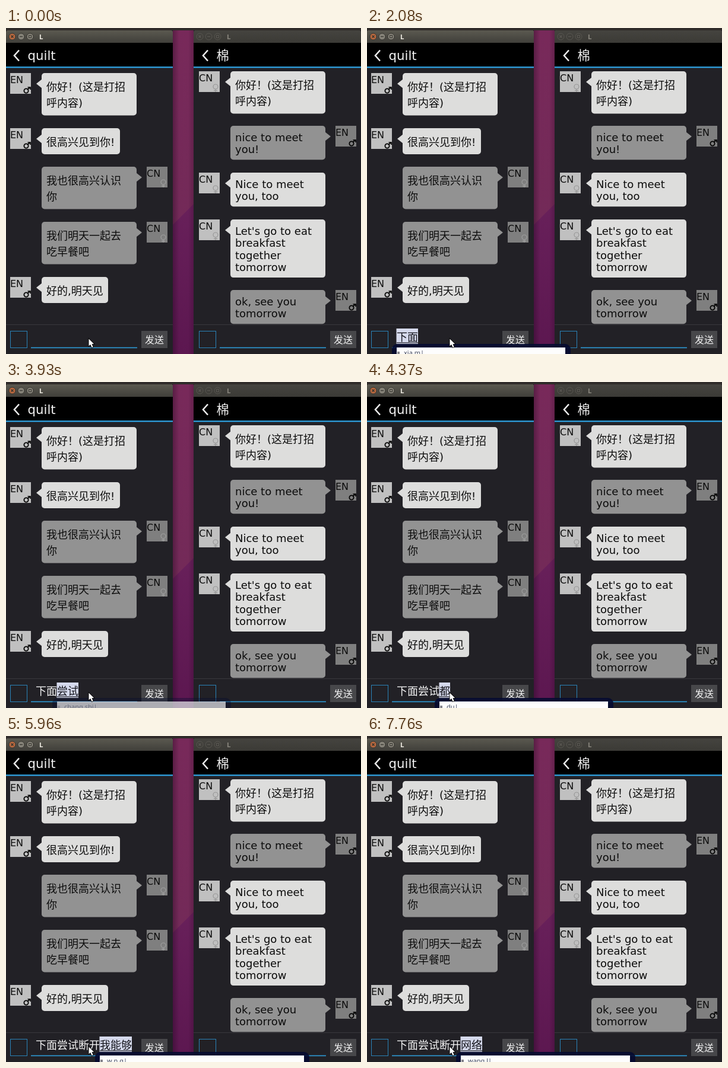
Recreate the animation shown at these times as an HTML page with a canvas. Size 598x550 px, loop 8 s.

```html
<!DOCTYPE html>
<html lang="zh-CN">
<head>
<meta charset="utf-8">
<title>Chat</title>
<style>
html, body { margin: 0; width: 100%; height: 100%; overflow: hidden; background: #222126; }
canvas { display: block; }
</style>
</head>
<body>
<canvas id="stage" width="598" height="550"></canvas>
<script>
const W = 598, H = 550, LOOP = 8000;
const FONT = '"DejaVu Sans", "Noto Sans CJK SC", "Noto Sans CJK", sans-serif';
const BLUE = '#2d9bd8';
const PALE = '#dddddc', GREY = '#929292';
const g = document.getElementById('stage').getContext('2d');

function rect(x, y, w, h, fill) {
  g.fillStyle = fill;
  g.fillRect(x, y, w, h);
}

function rounded(x, y, w, h, r, fill) {
  g.fillStyle = fill;
  g.beginPath();
  g.roundRect(x, y, w, h, r);
  g.fill();
}

function text(s, x, y, size, fill, font = FONT, weight = '') {
  g.font = `${weight} ${size}px ${font}`;
  g.fillStyle = fill;
  g.fillText(s, x, y);
}

function path(points, width, stroke) {
  g.beginPath();
  points.forEach(([x, y], i) => i ? g.lineTo(x, y) : g.moveTo(x, y));
  g.lineWidth = width;
  g.strokeStyle = stroke;
  g.stroke();
}

function ring(x, y, r, width, stroke) {
  g.beginPath();
  g.arc(x, y, r, 0, Math.PI * 2);
  g.lineWidth = width;
  g.strokeStyle = stroke;
  g.stroke();
}

function vertical(y0, y1, from, to) {
  const fill = g.createLinearGradient(0, y0, 0, y1);
  fill.addColorStop(0, from);
  fill.addColorStop(1, to);
  return fill;
}

function desktop() {
  rect(281, 0, 35, H, vertical(0, 330, '#78295a', '#732a58'));
  g.fillStyle = vertical(298, H, '#68205a', '#5c1750');
  g.beginPath();
  g.moveTo(281, 332);
  g.lineTo(316, 297);
  g.lineTo(316, H);
  g.lineTo(281, H);
  g.fill();
  const shade = g.createLinearGradient(281, 0, 316, 0);
  shade.addColorStop(0, 'rgba(20,0,20,.3)');
  shade.addColorStop(.3, 'rgba(20,0,20,0)');
  shade.addColorStop(.75, 'rgba(20,0,20,0)');
  shade.addColorStop(1, 'rgba(20,0,20,.2)');
  rect(281, 0, 35, H, shade);
  rect(0, 0, W, 4, '#302c2a');
}

function titleBar(x, w, active) {
  rounded(x, 4, w, 24, [4, 4, 0, 0],
    active ? vertical(4, 25, '#5b5950', '#403f3a') : vertical(4, 25, '#45443f', '#3b3a36'));
  const edge = active ? '#34332e' : '#5a5852';
  for (let i = 0; i < 3; i++) {
    const cx = x + 10.5 + i * 15, cy = 14.5;
    if (active) rounded(cx - 5.5, cy - 5.5, 11, 11, 5.5, i ? '#858278' : '#b9693f');
    ring(cx, cy, 5.5, 1, edge);
    if (i === 0) {
      path([[cx - 2, cy - 2], [cx + 2, cy + 2]], 1.2, edge);
      path([[cx + 2, cy - 2], [cx - 2, cy + 2]], 1.2, edge);
    } else if (i === 1) {
      path([[cx - 2.5, cy], [cx + 2.5, cy]], 1.2, edge);
    } else {
      g.strokeRect(cx - 2, cy - 2, 4, 4);
    }
  }
  text('L', x + 56, 19, 10, active ? '#e4e1d8' : '#85827a', FONT, 'bold');
}

function avatar(x, y, label, own) {
  rect(x, y, 35, 35, own ? '#7f7f7f' : '#c0c0c0');
  text(label, x, y + 16.5, 16, '#0a0a0a');
  if (label === 'EN') {
    ring(x + 27, y + 30, 3.6, 1.8, '#000');
    path([[x + 29.5, y + 27.5], [x + 33.5, y + 24]], 1.8, '#000');
    path([[x + 29.5, y + 24], [x + 34, y + 24], [x + 34, y + 28]], 1.6, '#000');
  } else {
    const tone = own ? '#a0a0a0' : '#979797';
    ring(x + 28, y + 26, 4, 1.2, tone);
    path([[x + 28, y + 30], [x + 28, y + 35]], 1.2, tone);
    path([[x + 25, y + 32.5], [x + 31, y + 32.5]], 1.2, tone);
  }
}

function message({ y, w = 160, own, from, lines }, x0) {
  const x = x0 + 60, fill = own ? GREY : PALE;
  const cjk = /[\u4e00-\u9fff]/.test(lines[0]);
  const step = cjk ? 27.5 : 20.4;
  rounded(x, y, w, lines.length * step + 16.5, 5, fill);
  const side = own ? x + w - 1 : x + 1, tip = own ? x + w + 9 : x - 9;
  g.beginPath();
  g.moveTo(side, y + 10);
  g.lineTo(tip, y + 18);
  g.lineTo(side, y + 26);
  g.fill();
  lines.forEach((s, i) => text(s, x + 8, y + (cjk ? 29.5 : 26) + i * step, 18, '#0c0c0c'));
  avatar(x0 + (own ? 237 : 7), y, from, own);
}

function chatWindow({ x, x0, w, active, title, messages }) {
  titleBar(x, w, active);
  rect(x, 25, w, 41, '#000');
  rect(x, 65, w, 485, '#222126');
  rect(x, 65, w, 2.4, BLUE);
  path([[x0 + 22, 37.5], [x0 + 14, 46.5], [x0 + 22, 55.5]], 2.6, '#eee');
  text(title, x0 + 36.5, 54, 21.3, '#f2f2f2');

  g.save();
  g.beginPath();
  g.rect(x, 67, w, 433);
  g.clip();
  messages.forEach(m => message(m, x0));
  g.restore();

  rect(x, 500, w, 1, '#39383d');
  g.lineWidth = 1;
  g.strokeStyle = '#2a83b8';
  g.strokeRect(x0 + 7.5, 511.5, 28, 28);
  rect(x0 + 42, 538.6, 179, 1.6, BLUE);
  rect(x0 + 228, 511, 44, 29, '#47474a');
  text('发送', x0 + 234, 531.5, 16, '#f2f2f2');
}

const windows = [
  { x: 0, x0: 0, w: 281, active: true, title: 'quilt', messages: [
    { y: 76, from: 'EN', lines: ['你好！(这是打招', '呼内容)'] },
    { y: 169, w: 132, from: 'EN', lines: ['很高兴见到你!'] },
    { y: 234, own: true, from: 'CN', lines: ['我也很高兴认识', '你'] },
    { y: 327, own: true, from: 'CN', lines: ['我们明天一起去', '吃早餐吧'] },
    { y: 420, w: 112, from: 'EN', lines: ['好的,明天见'] },
  ] },
  { x: 316, x0: 318, w: 282, active: false, title: '棉', messages: [
    { y: 73, from: 'CN', lines: ['你好！(这是打招', '呼内容)'] },
    { y: 165, own: true, from: 'EN', lines: ['nice to meet', 'you!'] },
    { y: 244, from: 'CN', lines: ['Nice to meet', 'you, too'] },
    { y: 323, from: 'CN', lines: ["Let's go to eat", 'breakfast', 'together', 'tomorrow'] },
    { y: 442, own: true, from: 'EN', lines: ['ok, see you', 'tomorrow'] },
  ] },
];

// Typing steps: time, committed text, composed text, pinyin, popup width, popup opacity
const steps = [
  [0, '', '', ''],
  [1440, '', '下', 'x', 284],
  [1600, '', '系', 'xi', 284],
  [1760, '', '下', 'xia', 284],
  [2080, '', '下面', 'xia m', 284],
  [2290, '', '下面', 'xia m', 284, .65],
  [2370, '下面', '', ''],
  [2500, '下面', '才', 'c', 284],
  [2620, '下面', '吃', 'ch', 284],
  [2740, '下面', '差', 'cha', 284],
  [2860, '下面', '长', 'chang', 284],
  [3000, '下面', '场所', 'chang s', 284],
  [3090, '下面', '尝试', 'chang sh', 284],
  [3150, '下面', '尝试', 'chang shi', 284],
  [3930, '下面', '尝试', 'chang shi', 284, .65],
  [4010, '下面尝试', '', ''],
  [4160, '下面尝试', '的', 'd', 284],
  [4280, '下面尝试', '都', 'du', 284],
  [4400, '下面尝试', '段', 'dua', 284],
  [4500, '下面尝试', '段', 'duan', 284],
  [4620, '下面尝试', '断开', 'duan k', 284],
  [4770, '下面尝试', '断开', 'duan ka', 284],
  [4920, '下面尝试', '断开', 'duan kai', 238],
  [5320, '下面尝试', '断开', 'duan kai', 238, .65],
  [5400, '下面尝试断开', '', ''],
  [5560, '下面尝试断开', '我', 'w', 284],
  [5760, '下面尝试断开', '我能', 'w n', 284],
  [5960, '下面尝试断开', '我能够', 'w n g', 344],
  [6110, '下面尝试断开', '我', 'w', 284],
  [6340, '下面尝试断开', '哇', 'wa', 238],
  [6570, '下面尝试断开', '完', 'wan', 238],
  [6740, '下面尝试断开', '网', 'wang', 238],
  [7760, '下面尝试断开', '网络', 'wang l', 285],
];

function popup(x, w, pinyin, alpha) {
  g.save();
  g.globalAlpha = alpha * (alpha < 1 ? .6 : .9);
  rounded(x - 8, 533, w + 17, 40, 9, '#050b30');
  g.globalAlpha = alpha;
  rect(x, 539, w, 11, '#fdfdfd');
  rect(x + 1, 546, 4, 4, '#85858c');
  text(pinyin + '|', x + 12, 552, 11, '#434a60', '"Noto Sans", sans-serif');
  g.restore();
}

function typing(t) {
  const [, done, composed, pinyin, w, alpha = 1] = steps.findLast(s => s[0] <= t);
  const x = 50 + done.length * 18;
  text(done, 50, 528, 18, '#f4f4f4');
  if (composed) {
    const cw = composed.length * 18;
    rect(x - .5, 507, cw + .5, 26, '#d5d9ec');
    text(composed, x, 528, 18, '#15151c');
    rect(x, 530.5, cw, 1.2, '#15151c');
    popup(x, w, pinyin, alpha);
  }
  if (t >= 360 && t < 1440) rect(49, 518, 2, 21, BLUE);
  if (t >= 3530 && t < 3930) rect(85, 511, 2, 28, BLUE);
}

function pointer(x, y) {
  const shape = [[0, 0], [0, 12], [2.8, 9.6], [5, 14.5], [7.2, 13.5], [5, 8.8], [8.6, 8.6]];
  g.beginPath();
  shape.forEach(([dx, dy]) => g.lineTo(x + dx, y + dy));
  g.closePath();
  g.lineWidth = 1.6;
  g.strokeStyle = '#000';
  g.stroke();
  g.fillStyle = '#fff';
  g.fill();
}

function draw() {
  const t = performance.now() % LOOP;
  desktop();
  windows.forEach(chatWindow);
  typing(t);
  pointer(139.5, 524.5);
  requestAnimationFrame(draw);
}

draw();
</script>
</body>
</html>
```
